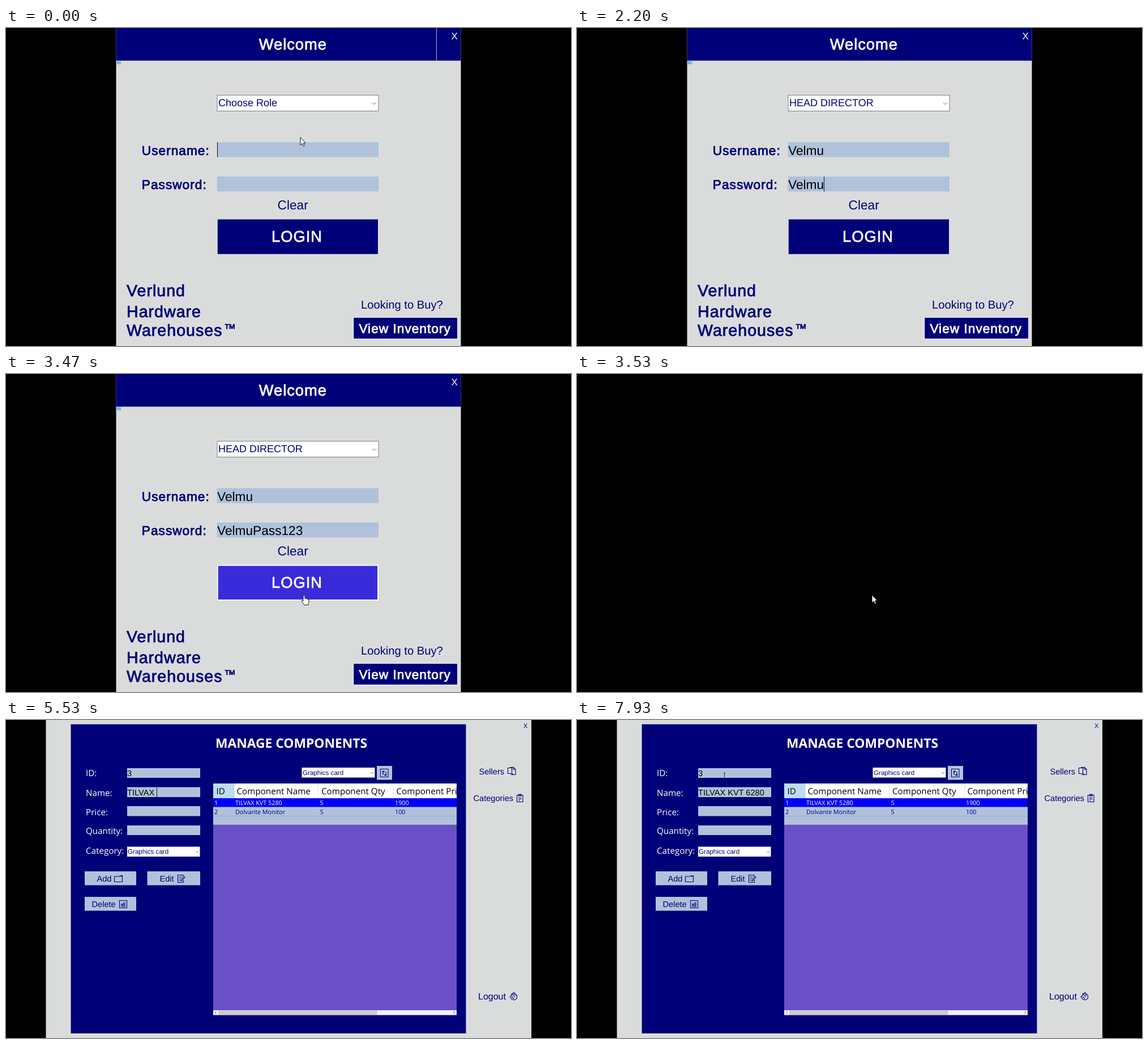
An HTML page for the animation above (8000 ms loop, 998 by 561 pixels).

```html
<!DOCTYPE html>
<html lang="en">
<head>
<meta charset="utf-8">
<title>Stock manager</title>
<style>
  html, body { margin: 0; width: 100%; height: 100%; overflow: hidden; background: #000; }
  svg { display: block; width: 100vw; height: 100vh; }
  text {
    font-family: "Liberation Sans", Arial, sans-serif; fill: #000078;
    white-space: pre; text-rendering: geometricPrecision;
  }
  .ui text, text.ui { font-family: "Open Sans", "Noto Sans", sans-serif; }
  .bold { stroke: #000078; stroke-width: .8px; letter-spacing: 1px; }
  text.white, .white text { fill: #fff; }
  .bold.white { stroke: #fff; }
  text.black, .black text { fill: #000; }
  .navy { fill: #000078; }
  .page { fill: #dadcdc; }
  .field { fill: #b0c2db; }
  .combo { fill: #fff; stroke: #7c7c84; }
  .line { fill: none; stroke: #000078; stroke-width: 1.1px; }
  .chev { fill: none; stroke: #666; }
  .s11 { font-size: 10.8px; }
  .s12 { font-size: 11.6px; }
  .s14 { font-size: 14.6px; }
  .s15 { font-size: 15.2px; }
  .s18 { font-size: 18px; }
  .s23 { font-size: 22.7px; }
  .s27 { font-size: 27.3px; }
  .s29 { font-size: 28.6px; }
  #submit { fill: #000078; }
  #submit.hover { fill: #3a2bda; stroke: #fff; stroke-width: 1.8px; }
</style>
</head>
<body>
<svg viewBox="0 0 998 561">
  <rect width="998" height="561"/>

  <g id="login">
    <rect class="page" x="194.5" width="609" height="561"/>
    <rect class="navy" x="194.5" width="609" height="57.6"/>
    <rect x="194.5" y="58.6" width="8.5" height="5.4" fill="#7db6e6"/>
    <rect id="divider" x="760" width="1" height="58" fill="#b4b4cc"/>
    <text class="bold white s27" x="446.7" y="37.5">Welcome</text>
    <text class="white" x="786.4" y="20" font-size="17">X</text>

    <rect class="combo" x="373" y="118.5" width="285" height="28"/>
    <text id="role" class="s18" x="375" y="138"></text>
    <path class="chev" d="M647 131.5l3.5 3.5 3.5-3.5"/>

    <text class="bold s23" x="239.8" y="223.5">Username:</text>
    <text class="bold s23" x="239.8" y="284">Password:</text>
    <rect class="field" x="372.7" y="201.5" width="285.3" height="26.3"/>
    <rect class="field" x="372.7" y="262" width="285.3" height="26.3"/>
    <text id="user" class="black s23" x="373" y="223.5"></text>
    <text id="pass" class="black s23" x="373" y="284"></text>

    <text class="s23" x="479.5" y="320">Clear</text>
    <rect id="submit" x="373.8" y="337.6" width="283.2" height="61.2"/>
    <text class="bold white s27" x="469" y="377">LOGIN</text>

    <text class="bold s29" x="213" y="473">Verlund</text>
    <text class="bold s29" x="213" y="510">Hardware</text>
    <text class="bold s29" x="213" y="543">Warehouses</text>
    <text class="bold" x="385" y="537" font-size="21">™</text>
    <text x="627" y="495" font-size="20.2">Looking to Buy?</text>
    <rect class="navy" x="613.7" y="510.7" width="184" height="37.8" stroke="#fff"/>
    <text class="bold white s23" x="623.4" y="538">View Inventory</text>
  </g>

  <g id="dash">
    <rect class="page" x="70.5" width="857.5" height="561"/>
    <rect x="114" y="7" width="699" height="547" fill="#f4f4f4"/>
    <rect class="navy" x="114.5" y="7.5" width="698" height="545.5"/>
    <text class="ui white" x="370" y="49" font-size="22.8" font-weight="700">MANAGE COMPONENTS</text>

    <g class="ui white s15">
      <text x="141" y="99">ID:</text>
      <text x="141" y="134">Name:</text>
      <text x="141" y="168">Price:</text>
      <text x="141" y="201">Quantity:</text>
      <text x="141" y="236">Category:</text>
    </g>
    <g class="field">
      <rect x="214" y="85" width="129" height="17"/>
      <rect x="214" y="118.5" width="129" height="17.5"/>
      <rect x="214" y="152" width="129" height="17.5"/>
      <rect x="214" y="186" width="129" height="17"/>
      <rect x="139" y="267" width="91" height="24.5"/>
      <rect x="249.5" y="267" width="93.5" height="24.5"/>
      <rect x="139" y="312" width="91" height="24.5"/>
      <rect x="655" y="81" width="27" height="24.5"/>
    </g>
    <g class="black s14">
      <text id="id" x="214" y="99"></text>
      <text id="name" x="214" y="133"></text>
      <text id="price" x="214" y="166"></text>
      <text id="qty" x="214" y="200"></text>
    </g>
    <rect x="214" y="223.5" width="128.5" height="17.5" fill="#fff"/>
    <text class="s12" x="215" y="236">Graphics card</text>
    <path class="chev" d="M335.5 231.5l2.2 2.2 2.2-2.2"/>
    <rect x="522.5" y="84" width="129" height="17.5" fill="#fff"/>
    <text class="s12" x="524" y="96.5">Graphics card</text>
    <path class="chev" d="M644.5 92l2.2 2.2 2.2-2.2"/>

    <g class="s14">
      <text x="160.5" y="285">Add</text>
      <text x="271.5" y="285">Edit</text>
      <text x="151.5" y="330">Delete</text>
      <text x="835.5" y="95.5">Sellers</text>
      <text x="825.5" y="142.5">Categories</text>
    </g>
    <text x="834" y="492.5" font-size="16">Logout</text>
    <text x="914" y="14" font-size="11">X</text>

    <g class="line">
      <path d="M661.5 86.5h13.5v14h-13.5zM666 97v-6.5h3M665 92l1-2 2 2M671 91v6.5h-3M672 96l-1 2-2-2"/>
      <path d="M191.5 276h9l1-1.5h4v11h-14zM202 276h3.5"/>
      <path d="M313 276v-2.5h-9.5v13h10v-4M305.5 277h5M305.5 280h3M305.5 283h2M309 284l.5-2.5 5-5.5 1.500 1.500-5 5.5z"/>
      <path d="M200.5 318.5h13v13h-13zM204 324.5v4.500h6v-7M206 324v4M208 321v7M203 324.5h3"/>
      <path d="M886.5 84.5h7v10h-7zM890 84l6-1 4 4v9.5h-8.5M896 83v4h4M893.5 94.5l3 2"/>
      <path d="M902.5 132.5h10.5v12h-10.5zM905.5 131h4.5v3h-4.5zM905 137h5.5M905 139.5h5.5M905 142h3"/>
      <path d="M893.5 483l4-2 5 5v5l-4 3-5-1-3.500-5 2-1zM893.5 483l5 6M896 482l4 5M893 488l4 4"/>
    </g>

    <rect x="366" y="112" width="430" height="408.5" fill="#6a50c6"/>
    <rect x="366" y="112" width="430" height="26" fill="#fff"/>
    <rect x="366" y="112" width="37" height="26" fill="#bcdcf4"/>
    <path d="M403.5 112v26M551.5 112v26M684.5 112v26" stroke="#e2e2e2"/>
    <svg class="ui black s15" x="366" y="112" width="430" height="26" style="width:430px;height:26px" viewBox="366 112 430 26">
      <text x="371.5" y="131">ID</text>
      <text x="407.5" y="131">Component Name</text>
      <text x="557" y="131">Component Qty</text>
      <text x="689.5" y="131">Component Price</text>
    </svg>
    <rect x="366" y="138" width="430" height="15.5" fill="#0000f4"/>
    <rect class="field" x="366" y="153.5" width="430" height="31"/>
    <path d="M366 169.5h430M366 184.5h430" stroke="#98a8c0"/>
    <g class="ui white s11">
      <text x="368" y="150">1</text>
      <text x="405" y="150">TILVAX KVT 5280</text>
      <text x="554.5" y="150">5</text>
      <text x="687" y="150">1900</text>
    </g>
    <g class="ui s11">
      <text x="368" y="165.5">2</text>
      <text x="405" y="165.5">Dolvante Monitor</text>
      <text x="554.5" y="165.5">5</text>
      <text x="687" y="165.5">100</text>
    </g>
    <rect x="366" y="512" width="430" height="8.5" fill="#f1f1f1"/>
    <rect x="375" y="512.5" width="280.5" height="7.5" fill="#cbcbcb"/>
    <path class="chev" d="M371.5 514l-2.2 2.2 2.2 2.2M790.5 514l2.2 2.2-2.2 2.2"/>
  </g>

  <rect id="caret" width="1" fill="#111"/>
  <g id="pointer">
    <path id="arrow" d="M0 0V13.5L3.2 10.7 5.2 15.5 7.4 14.6 5.4 9.8H9.3Z" fill="#fff" stroke="#000" stroke-width=".9"/>
    <path id="hand" d="M4 1.5Q5.5-.8 7 1.5V6Q8.5 5 9.5 6.6 11 5.8 11.8 7.3 13.8 6.8 14 8.8V12.5L12.5 17.5H6L1.5 11.5Q.5 9 2.5 9.3L4 10.8Z" fill="#fff" stroke="#000" stroke-width=".9"/>
    <path id="beam" d="M-2-4.5H2M0-4.5V4.5M-2 4.5H2" fill="none" stroke="#333"/>
  </g>
</svg>
<script>
const LOOP = 8000, BLACKOUT = 3530, DASH = 3600;
const $ = id => document.getElementById(id);
const show = (id, on) => $(id).style.visibility = on ? 'visible' : 'hidden';

// Text of each field with the time of each keystroke
const typing = {
  user: ['Velmu', [1070, 1200, 1270, 1400, 1470]],
  pass: ['VelmuPass123', [1870, 1930, 2000, 2070, 2200, 2470, 2530, 2670, 2730, 2930, 3000, 3070]],
  id: ['3', [4070]],
  name: ['TILVAX KVT 6280', [4730, 4870, 5000, 5130, 5270, 5400, 5530,
    5670, 5800, 5930, 6130, 6270, 6400, 6870, 7000]]
};

// Caret top, height and left edge per field
const fields = {
  user: [201.5, 26.5, 373], pass: [262, 26.5, 373],
  id: [85, 17, 214], name: [119, 17, 214], price: [152, 17, 214], qty: [186, 17, 214]
};

const focus = [
  [0, 'user'], [530, ''], [1000, 'user'], [1530, 'pass'], [3400, ''],
  [3870, 'id'], [4330, 'name'], [4600, ''], [4730, 'name'], [6600, ''],
  [6870, 'name'], [7070, 'qty'], [7600, ''], [7870, 'price'], [7930, '']
];

const path = [
  [0, 520, 193], [70, 520, 193], [400, 519, 133], [600, 519, 133],
  [1000, 510, 214], [3070, 519, 222], [3400, 521, 390], [DASH, 521, 390]
];
const hidden = [[1070, 3070], [4730, 6400], [6870, 7200]];

const ease = p => p * p * (3 - 2 * p);

function pointerAt(t) {
  if (t >= DASH) return [260.5, 98];
  const i = path.findIndex(p => p[0] > t);
  const [t0, x0, y0] = path[i - 1], [t1, x1, y1] = path[i];
  const p = ease((t - t0) / (t1 - t0));
  return [x0 + (x1 - x0) * p, y0 + (y1 - y0) * p];
}

function pointerKind(t, y) {
  if (hidden.some(([a, b]) => t >= a && t < b)) return '';
  if (t >= DASH) return 'beam';
  if (t >= BLACKOUT) return 'arrow';
  if (y > 338) return 'hand';
  return (y > 201 && y < 228) || (y > 262 && y < 289) ? 'beam' : 'arrow';
}

function draw(t) {
  show('login', t < BLACKOUT);
  show('dash', t >= DASH);
  show('divider', t < 1600);
  $('role').textContent = t < 530 ? 'Choose Role' : 'HEAD DIRECTOR';

  for (const id in typing) {
    const [text, keys] = typing[id];
    $(id).textContent = text.slice(0, keys.filter(k => k <= t).length);
  }

  const active = focus.filter(f => f[0] <= t).pop()[1];
  show('caret', active);
  if (active) {
    const [y, h, x] = fields[active], caret = $('caret');
    const w = $(active).textContent ? $(active).getComputedTextLength() : 0;
    caret.setAttribute('x', Math.round(x + w));
    caret.setAttribute('y', y);
    caret.setAttribute('height', h);
  }

  const [x, y] = pointerAt(t), kind = pointerKind(t, y);
  $('pointer').setAttribute('transform', `translate(${x} ${y})`);
  for (const k of ['arrow', 'hand', 'beam']) show(k, k === kind);
  $('submit').classList.toggle('hover', kind === 'hand');
}

const start = performance.now();
function tick() {
  draw((performance.now() - start) % LOOP);
  requestAnimationFrame(tick);
}
tick();
</script>
</body>
</html>
```
